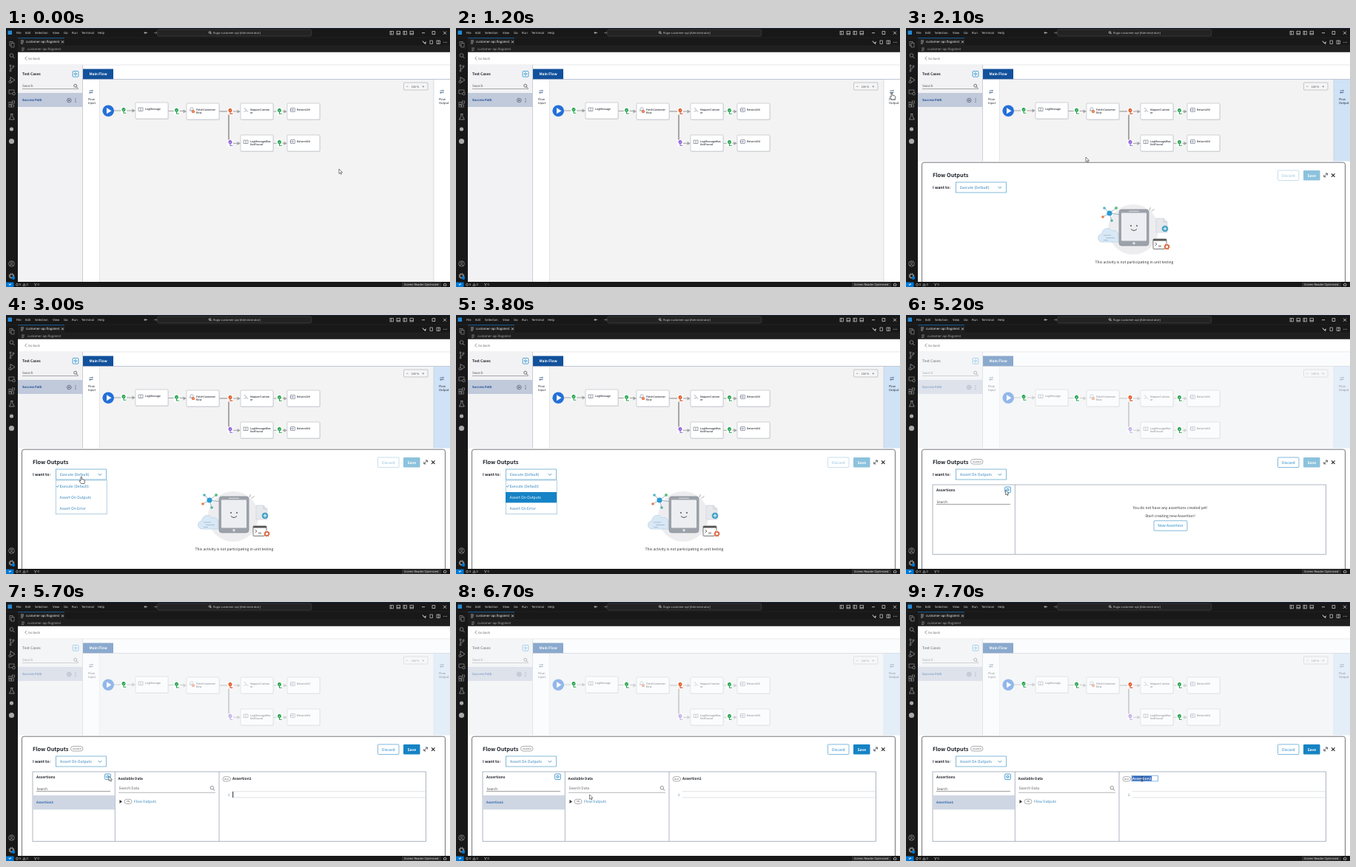
Recreate the animation shown at these times as an HTML page. Size 600 by 351 pixels, loop 8000 ms.

```html
<!DOCTYPE html>
<html lang="en">
<head>
<meta charset="utf-8">
<title>Flow test editor</title>
<style>
html, body { margin: 0; width: 100%; height: 100%; overflow: hidden; background: #181818; }
svg { display: block; width: 600px; height: 351px; }
text { font-family: "Noto Sans CJK JP", "Noto Sans CJK SC", "Noto Sans CJK", "Open Sans", sans-serif; text-rendering: geometricPrecision; white-space: pre; }
.ui { font-family: "Open Sans", "Noto Sans", sans-serif; }
</style>
</head>
<body>
<svg id="stage" viewBox="0 0 600 351"></svg>
<script>
const BLUE = '#1a86c8', LINK = '#2f82bb', INK = '#1f232b';

// Markup helpers; text is centred vertically on y.
const T = (x, y, size, str, fill = INK, weight = 400, extra = '') =>
  `<text x="${x}" y="${y + size * .36}" font-size="${size}" fill="${fill}" font-weight="${weight}" ${extra}>${str}</text>`;
const UI = (x, y, size, str, fill = '#e2e2e2', extra = '') => T(x, y, size, str, fill, 400, `class="ui" ${extra}`);
const R = (x, y, w, h, fill = 'none', stroke = 'none', r = 0, sw = .7) =>
  `<rect x="${x}" y="${y}" width="${w}" height="${h}" fill="${fill}" stroke="${stroke}" stroke-width="${sw}" rx="${r}"/>`;
const C = (x, y, r, fill = 'none', stroke = 'none', sw = .8) =>
  `<circle cx="${x}" cy="${y}" r="${r}" fill="${fill}" stroke="${stroke}" stroke-width="${sw}"/>`;
const P = (d, stroke = 'none', sw = .8, fill = 'none') =>
  `<path d="${d}" stroke="${stroke}" stroke-width="${sw}" fill="${fill}"/>`;
const G = (id, ...parts) => `<g id="${id}">${parts.join('')}</g>`;
const MID = 'text-anchor="middle"';

const searchIcon = (x, y, color, r = 2) =>
  C(x, y, r, 'none', color) + P(`M${x + r * .7} ${y + r * .7}l${r} ${r}`, color, 1);
const gear = (x, y, r, color) =>
  C(x, y, r, 'none', color, r * .6) +
  `<circle cx="${x}" cy="${y}" r="${r * 1.4}" fill="none" stroke="${color}" stroke-width="${r * .5}" stroke-dasharray="${r * .55}"/>`;
const gearButton = (x, y) => R(x - 3.8, y - 3.8, 7.6, 7.6, '#fff', BLUE, 1, .8) + gear(x, y, 1.3, BLUE);
const swapIcon = (x, y) => P(`M${x - 2.5} ${y - 1.2}h5l-1.3-1.2M${x + 2.5} ${y + 1.2}h-5l1.3 1.2`, '#45628a', .9);
const pill = (x, y, w, h, str) => R(x, y, w, h, '#fff', '#777', h / 2, .6) + T(x + w / 2, y + h / 2, 2.8, str, '#444', 400, MID);

function windowChrome() {
  const menu = [[14, 'File'], [26, 'Edit'], [39, 'Selection'], [63, 'View'], [78, 'Go'], [89, 'Run'], [102, 'Terminal'], [124, 'Help']];
  const dim = '#8a8a8a';
  return [
    R(0, 0, 600, 32.5, '#181818'), R(0, 13, 16, 338, '#181818'), R(0, 0, 600, .8, '#14233f'),
    R(16, 13.5, 63, 11, '#1f1f1f'), R(16, 24, 584, 8.5, '#1f1f1f'),
    R(16, 13, 63, .8, '#1468b0'), P('M0 13h16M79 13h521M79 24h521', '#2b2b2b', .5),
    R(2.5, 3.5, 5.5, 5.5, '#2389d7'),
    ...menu.map(([x, s]) => UI(x, 6.5, 4.2, s)),
    P('M191 6.5h-4l1.7-1.7M187 6.5l1.7 1.7', '#ccc'), P('M200 6.5h4l-1.7-1.7M204 6.5l-1.7 1.7', '#777'),
    R(204.7, 2, 208, 9, '#232323', '#484848', 2, .6), searchIcon(275.5, 6, '#ccc', 1.3),
    UI(280, 6.5, 3.95, 'flogo-customer-api [Administrator]', '#d0d0d0'),
    [519, 528, 537, 546].map((x, i) => R(x, 4.3, 4.6, 4.6, 'none', '#ccc') +
      P(i % 2 ? `M${x} 7.3h4.6` : `M${x + 1.7} 4.3v4.6`, '#ccc', .7)).join(''),
    P('M562 6.7h4', '#ddd'), R(576, 4.7, 3.8, 3.8, 'none', '#ddd'), P('M591 4.7l4 4m0-4l-4 4', '#ddd'),
    P('M20 17h4M20 19h4M20 21h3', '#bbb'),
    UI(27, 18.8, 4.3, 'customer-api.flogotest', '#fff'), P('M75 17.3l3 3m0-3l-3 3', '#eee', .7),
    P('M21 27h4M21 28.8h4M21 30.5h3', '#999', .7), UI(29, 28.4, 4.3, 'customer-api.flogotest', '#b0b0b0'),
    P('M563 17.5l2 3 3-1.5M566 20l1 2', '#ddd', 1), R(573, 17, 3.5, 4.5, 'none', '#ccc'),
    R(582, 17, 4.6, 4.6, 'none', '#ccc'), P('M584.3 17v4.6', '#ccc'),
    [591.5, 593.5, 595.5].map(x => C(x, 19.3, .5, '#ccc')).join(''),
    R(5, 18.5, 4, 5.5, 'none', dim), R(7, 20.5, 4, 5.5, '#181818', dim), searchIcon(7.5, 37, dim, 2.4),
    P('M6 51v7M10 52.5q0 3-4 3', dim), C(6, 51, 1.1, '#181818', dim), C(10, 52, 1.1, '#181818', dim), C(6, 58, 1.1, '#181818', dim),
    P('M6 66.5l6 4-6 4z', dim, .9), C(5.5, 73, 1.6, '#181818', dim),
    R(4, 84, 7, 5, 'none', dim), C(10.5, 89, 1.8, '#181818', dim),
    R(4, 100.5, 3, 3, 'none', dim), R(4, 104, 3, 3, 'none', dim), R(7.5, 104, 3, 3, 'none', dim), R(8.5, 99, 3, 3, 'none', dim),
    P('M6 116.5h3.6M6.8 116.5v3l-2.5 4.5h7l-2.5-4.5v-3', dim, .9),
    C(7.5, 137, 2.6, '#a8a8a8'), C(7.5, 153.5, 3.6, '#a8a8a8'),
    C(7.5, 319.5, 3.8, 'none', dim), C(7.5, 318.4, 1.3, 'none', dim), P('M5 322q2.5-3 5 0', dim),
    gear(7.5, 336, 2.4, dim), C(10, 338.7, 2.2, '#0078d4'),
    R(0, 344, 600, 7, '#181818'), R(0, 344.5, 10.5, 6.5, '#0078d4'), P('M4 349l2.5-3M3.5 346.5l1.5 1.5M7 347l-1.5 1.5', '#fff', .7),
    C(15, 347.8, 1.5, 'none', '#ccc', .6), UI(17.7, 347.8, 4, '0'), P('M22.8 349.2l1.7-3 1.7 3z', '#ccc', .6), UI(27.5, 347.8, 4, '0'),
    P('M38 346l1.8 1.8v2M41.5 346l-1.7 1.8', '#ccc', .7), UI(42.5, 347.8, 4, '0'),
    R(535, 344.5, 53, 6.5, '#2f2f2f'), UI(538, 347.8, 3.95, 'Screen Reader Optimized', '#e8e8e8'),
    P('M591.5 349.2v-2.2q1.7-2 3.4 0v2.2z', '#ddd', .7)
  ].join('');
}

function node(x, y, lines, kind) {
  const ix = x + 7, iy = y + 9, c = '#777e89';
  const icon = {
    log: P(`M${ix - 3} ${iy - 2}h2.5l.5.6.5-.6h2.5v4.5h-6zM${ix} ${iy - 1.5}v4`, c, .7),
    fetch: C(ix, iy - 1, 2.2, 'none', '#9aa0aa', .8) + P(`M${ix - 3.5} ${iy + 1}h7`, '#9aa0aa') + C(ix + 2, iy + 2.2, 2, '#e8622c') + P(`M${ix + 1} ${iy + 2.2}h2`, '#fff', .6),
    map: P(`M${ix - 2.5} ${iy - 2}h2l2 4h2M${ix - 2.5} ${iy + 2}h2l1-2`, '#9aa0aa', .7),
    ret: R(ix - 2.5, iy - 2.5, 6, 5, 'none', c, .5) + P(`M${ix - 3.5} ${iy}h5l-1.5-1.3m1.5 1.3l-1.5 1.3`, '#6b78b5', .7)
  }[kind];
  return R(x + .5, y + .7, 44, 22, '#d8d9dc', 'none', 1) + R(x, y, 44, 22, '#fff', '#b3b6bc', 1, .6) + icon +
    lines.map((s, i) => T(x + 13, y + 8.8 + i * 4.2, 3.5, s, '#4c5058', 700)).join('');
}
const arrowHead = (x, y) => P(`M${x} ${y - 2.4}l4.5 2.4-4.5 2.4z`, 'none', 0, '#a3a3a3');
const badge = (x, y, color) =>
  R(x - 3.8, y - 4.6, 7.8, 9.4, '#fff', 'none', 1) + C(x, y - 1.4, 2.5, color) + P(`M${x} ${y}v3.3h3.3`, color, 1.1) +
  P(`M${x - 1.2} ${y - 1.4}l1 1 1.5-2`, '#fff', .6);

function editor() {
  return [
    R(16, 32, 584, 313, '#fff'), P('M28 38.7l-2.3 2.4 2.3 2.4', '#666', .7), T(30, 41.2, 4.25, 'Go back', '#666'),
    P('M16 50h584', '#dcdde0', .7),
    R(16, 50.4, 87.5, 294, '#f2f2f4'), T(22, 62.5, 4.9, 'Test Cases', INK, 700), gearButton(94, 62.3),
    T(22, 78.8, 4.5, 'Search', '#555'), P('M22 82.5h76', '#777', .6), searchIcon(93.7, 78.2, '#555'),
    R(16, 88, 87.5, 19, '#c0cadb'), T(22, 97.7, 4.2, 'Success Path', '#1f4e94', 700),
    C(85.3, 98, 2.8, 'none', '#46536b', .7), P('M84.5 96.6l2.3 1.4-2.3 1.4z', 'none', 0, '#46536b'),
    [95.8, 98, 100.2].map(y => C(94, y, .6, '#46536b')).join(''),
    R(103.5, 69, 496.5, 276, '#f3f3f4'), R(104, 55.5, 41, 14, '#12519b'), P('M103.5 69.5h497', '#a9b4c8', .7),
    T(124.5, 62.6, 4.85, 'Main Flow', '#fff', 700, MID),
    R(104, 70, 22, 275, '#fff'), P('M103.5 50v295', '#b9bdc6', .7), P('M126.3 70v275', '#d5d7db', .6),
    swapIcon(115, 86.3), T(111, 96.2, 4, 'Flow'), T(111, 101.5, 4, 'Input'),
    R(578, 70, 22, 275, '#fff'), G('outputOn', R(578, 70, 22, 275, '#cfe2f6')),
    P('M578 70v275', '#c5cad2', .6),
    swapIcon(589, 86.3), T(585, 96.2, 4, 'Flow'), T(585, 101.5, 4.1, 'Output'),
    R(537.5, 74, 32.5, 10, '#f5f5f6', '#a5a8ae', 1, .6), P('M541 79.3h2.4M562.5 79.3h2.6m-1.3-1.3v2.6', '#777', .6),
    T(553, 79.2, 3.8, '100 %', '#444', 400, MID),
    P('M146 112h26M219 112.5h22M307 113h6M361 113h15M361 156.3h15M301 113v43.3h12', '#a3a3a3', 1),
    P('M288 113h13v43', '#8f8985', 1.1),
    [[170.5, 112], [239.5, 113], [312.5, 113.2], [375.5, 113.2], [312.5, 156.3], [375.5, 156.3]].map(p => arrowHead(...p)).join(''),
    C(138.2, 112.3, 7.8, '#2470d8'), P('M136 108.3l6.5 4-6.5 4z', 'none', 0, '#fff'),
    node(175, 101, ['LogMessage'], 'log'), node(244, 102, ['FetchCustomer', 'Row'], 'fetch'),
    node(317, 102, ['MapperCustom', 'er'], 'map'), node(380, 102, ['Return200'], 'ret'),
    node(317, 145, ['LogMessageWas', 'NotFound'], 'log'), node(380, 145, ['Return404'], 'ret'),
    badge(303, 156, '#8a5bd6'),
    G('veil', R(16, 50.4, 584, 294, '#f8f9fb')),
    badge(159, 112, '#1fa34a'), badge(230.5, 112.7, '#1fa34a'), badge(369.5, 113, '#1fa34a'), badge(369.5, 156, '#1fa34a'), badge(303, 112.8, '#e0521f')
  ].join('');
}

function emptyArt() {
  const dots = [[275, 251, 3.6, '#2e9cd0'], [268, 244, 1.8, '#4fb3c4'], [284, 244, 2, '#5bbf7a'], [266, 256, 1.8, '#e8784a'], [290, 253, 2, '#e8784a'], [278, 261, 1.8, '#53b0a5']];
  return [
    C(307, 273, 34, '#ededf0'),
    dots.slice(1).map(d => P(`M275 251L${d[0]} ${d[1]}`, '#7f97a8', .7)).join(''), dots.map(d => C(...d)).join(''),
    P('M265 290a5.5 5.5 0 0 1 0-11a7 7 0 0 1 13-4a6.5 6.5 0 0 1 9 5v10z', '#b5cfe4', .7, '#d9e8f5'),
    P('M267 281h10M270 284.5h12M267 287.5h6', '#94b6d2', .8),
    R(288, 246, 40, 49, '#9da2aa', '#8a9099', 3.5, .8), R(291, 250.5, 34, 38, '#eceef1', 'none', 1),
    R(301, 247.8, 14, .9, '#e0e2e6', 'none', .4), C(308, 291.8, 1.7, '#e0e2e6'),
    C(304, 268, .9, '#444'), C(312, 268, .9, '#444'), P('M304 272.5q4 4 8 0', '#444', .9),
    P('M329 247l1.5-4M331.5 248.5l4-3', '#888', .7),
    P('M338 258h10l5 5v14h-15z', '#ccd2da', .7, '#e6e8ec'), P('M348 258v5h5', '#c2cad3'),
    C(350, 272, 4.3, '#41a0c4'), P('M347.5 272h5m-2.5-2.5v5', '#fff', 1),
    R(334, 286, 18, 13.5, '#fff', '#555', 1, .8), R(334, 286, 18, 2.4, '#555', 'none', 1),
    P('M336.5 291l2.5 2-2.5 2M341 295.5h4', '#444', .8), C(352.5, 296.5, 4.2, '#fff'), gear(352.5, 296.5, 2.5, '#d9653a'),
    T(308.5, 317, 5, 'This activity is not participating in unit testing', '#333', 400, MID)
  ].join('');
}

const discard = (text, border) => R(502.5, 193, 28.5, 13.5, '#fff', border, 1) + T(516.8, 199.8, 5.1, 'Discard', text, 400, MID);
const save = fill => R(537, 193, 22.5, 13.5, fill, 'none', 1) + T(548.3, 199.8, 5, 'Save', '#fff', 700, MID);

function panel() {
  return [
    R(16, 180.5, 584, 175, '#fff'), R(21.5, 182.2, 572, 175, '#fff', '#50545a', 3, .8),
    T(36, 199.2, 7.3, 'Flow Outputs', INK, 700),
    G('discardOff', discard('#8fc1dc', '#b0d2e5')), G('discardOn', pill(87.5, 195.5, 16.5, 6.5, 'Asserted'), discard(BLUE, '#4f9dcc')),
    G('saveOff', save('#8cc2dc')), G('saveOn', save('#1583c4')),
    P('M565 201.5l4.3-4.3M566.8 197h2.6v2.6M564.8 199.2v2.6h2.6', '#333', .8),
    P('M575 197.3l4.5 4.5m0-4.5l-4.5 4.5', '#222', 1.1),
    T(36, 216, 5.2, 'I want to:', INK, 700), R(67.5, 209, 68, 14, '#fff', '#4f9dcc', 0, .7), P('M124.5 215l2.3 2.3 2.3-2.3', LINK, .8),
    G('chosenDefault', T(73, 216, 5, 'Execute (Default)', LINK), emptyArt()),
    G('chosenAssert',
      T(73, 216, 5.05, 'Assert On Outputs', LINK),
      R(36, 230, 531.5, 94.3, '#fff', '#9aa2b2', 0, .8), P('M147.3 230v94', '#9aa2b2', .8),
      T(41, 237.2, 4.95, 'Assertions', INK, 700), gearButton(137.5, 236.8),
      T(41.5, 253, 4.6, 'Search', '#444'), P('M41 256.5h100', '#777', .7),
      G('noAssertions',
        T(357, 261.3, 5.05, 'You do not have any assertions created yet!', '#333', 400, MID),
        T(357, 272, 5.05, 'Start creating new Assertion!', '#333', 400, MID),
        R(335, 278.8, 45, 13.5, '#fff', '#4f9dcc', 1), T(357.3, 285.6, 5.1, 'New Assertion', BLUE, 400, MID)),
      G('assertion',
        R(36.5, 262, 110.5, 19.3, '#cfd6e3'), T(41, 271.7, 4.4, 'Assertion1', '#2a66a8', 700),
        P('M288 230v94', '#9aa2b2', .8), T(151.5, 239.6, 4.75, 'Available Data', INK, 700),
        T(152.5, 252.2, 4.95, 'Search Data', '#666'), P('M152 258.3h131', '#888', .6), searchIcon(278.3, 251.7, '#777', 2.2),
        P('M153.5 268l3.5 2.5-3.5 2.5z', 'none', 0, '#333'), pill(160, 267.3, 10, 6.2, 'Obj'), T(173, 270.7, 4.8, 'Flow Outputs', LINK),
        pill(293, 236.7, 10.5, 6.3, 'Bool'),
        T(301, 261, 4.6, '1', '#3c839f', 400, MID), P('M306 256.8h261M306 265h261', '#d3d6da', .7),
        G('caret', P('M306.7 257v8', '#111', .9)),
        G('nameText', T(306, 239.7, 4.9, 'Assertion1', INK, 700)),
        G('nameInput', R(305, 235.2, 35.5, 7.7, '#fff', '#5b9bd5', 0, .7), R(305.5, 235.8, 26.5, 6.6, '#2b62b8'), T(306, 239.3, 4.9, 'Assertion1', '#fff', 700))))
  ].join('');
}

const option = (y, str, color) => T(72.5, y, 5, str, color);
const menu = () => G('menu',
  R(67.3, 224, 68.9, 45.8, '#fff', '#8fb8d3', 0, .7), P('M68.3 232l1.2 1.3 2-2.8', BLUE, .8),
  option(232.2, 'Execute (Default)', LINK), option(262.6, 'Assert On Error', LINK),
  G('optionIdle', option(247.3, 'Assert On Outputs', LINK)),
  G('optionHover', R(67, 240, 69, 14.4, '#1583c6'), option(247.3, 'Assert On Outputs', '#fff')));

const cursors = () => G('cursor',
  G('arrow', P('M0 0v6.4l1.5-1.3 1 2.2 1-.5-1-2.1h2z', '#333', .6, '#fff')),
  G('hand', P('M-.8 0q.8-1 1.6 0v3.2l3.2.8q1 .4.8 1.6l-.6 3.4h-4.4l-2.6-3.6q.4-1.4 2 0z', '#333', .7, '#fff')),
  G('ibeam', P('M-1.3-3h2.6M0-3v6M-1.3 3h2.6', '#333', .7)));

document.getElementById('stage').innerHTML =
  editor() + G('panel', panel()) + menu() + windowChrome() + cursors();

// Pointer stops: time, x, y, shape from then on.
const track = [
  [0, 450, 191, 'arrow'], [850, 588, 88, 'arrow'], [1100, 589, 88, 'hand'], [1800, 589, 88, 'hand'],
  [1900, 540, 100, 'arrow'], [2100, 243, 175, 'arrow'], [2400, 150, 205, 'arrow'], [2700, 103, 216, 'hand'],
  [2900, 103, 216, 'hand'], [3400, 91, 249, 'hand'], [3600, 91, 249, ''], [4400, 85, 250.5, 'ibeam'],
  [4550, 85, 250.5, 'ibeam'], [4900, 110, 245, 'arrow'], [5300, 139, 236, 'hand'], [5650, 139, 236, 'arrow'],
  [6250, 139, 236, 'arrow'], [6600, 160, 264, 'arrow'], [7050, 319, 240, 'ibeam'], [8000, 319, 240, 'ibeam']
];
const el = id => document.getElementById(id);
const show = (id, on) => { el(id).style.display = on ? '' : 'none'; };
const ramp = (t, a, b) => { const k = Math.min(1, Math.max(0, (t - a) / (b - a))); return k * k * (3 - 2 * k); };

function draw(t) {
  const i = track.findLastIndex(p => p[0] <= t), a = track[i], b = track[i + 1];
  const k = ramp(t, a[0], b[0]);
  el('cursor').setAttribute('transform', `translate(${a[1] + (b[1] - a[1]) * k} ${a[2] + (b[2] - a[2]) * k})`);
  for (const shape of ['arrow', 'hand', 'ibeam']) show(shape, a[3] === shape);

  const asserting = t >= 3900, created = t >= 5700, renaming = t >= 7200;
  show('outputOn', t >= 1400);
  show('panel', t >= 1400);
  el('panel').setAttribute('transform', `translate(0 ${165 * (1 - ramp(t, 1340, 1500))})`);
  el('veil').setAttribute('opacity', .52 * ramp(t, 3850, 4150));
  show('menu', t >= 2900 && !asserting);
  show('optionHover', t >= 3200);
  show('optionIdle', t < 3200);
  show('chosenDefault', !asserting);
  show('chosenAssert', asserting);
  show('discardOff', !asserting);
  show('discardOn', asserting);
  show('saveOff', !created);
  show('saveOn', created);
  show('noAssertions', !created);
  show('assertion', created);
  show('caret', t < 6000);
  show('nameText', !renaming);
  show('nameInput', renaming);
}
function tick(now) {
  draw(now % 8000);
  requestAnimationFrame(tick);
}
tick(performance.now());
</script>
</body>
</html>
```
